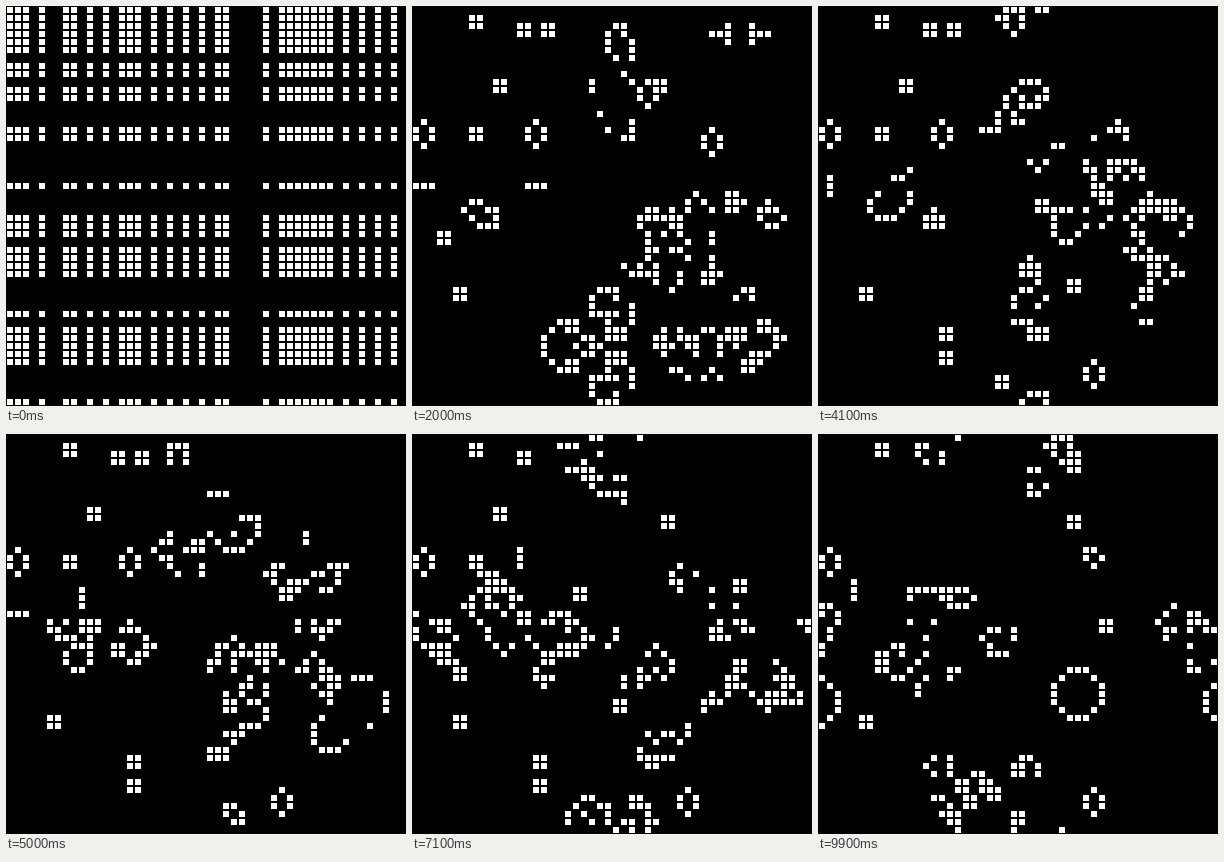
A matplotlib script that plays this animation: 400 px wide and 400 px high, repeating every 10000 ms.

```python
import numpy as np
import matplotlib.pyplot as plt
from matplotlib.animation import FuncAnimation

CELLS, CELL, STEPS = 50, 8, 100

# Seed: every crossing of a live row and a live column
COLS = [0, 1, 2, 4, 7, 8, 10, 12, 14, 15, 16, 18, 20, 22, 24, 26, 27, 32,
        *range(34, 41), 42, 44, 46, 48]
ROWS = [*range(6), 7, 8, 10, 11, 15, 16, 22, 26, 27, 28,
        *range(30, 34), 38, *range(40, 45), 49]


def step(grid):
    """One Game of Life generation on a torus."""
    total = sum(np.roll(grid, (dy, dx), (0, 1))
                for dy in (-1, 0, 1) for dx in (-1, 0, 1))
    return ((total == 3) | ((total == 4) & (grid == 1))).astype(int)


def history():
    grid = np.zeros((CELLS, CELLS), int)
    grid[np.ix_(ROWS, COLS)] = 1
    states = [grid]
    while len(states) < STEPS:
        states.append(step(states[-1]))
    return states


tile = np.zeros((CELL, CELL), int)
tile[1:7, 1:7] = 1
states = history()

size = CELLS * CELL
fig = plt.figure(figsize=(size / 100, size / 100), dpi=100, facecolor="black")
ax = fig.add_axes([0, 0, 1, 1])
ax.axis("off")
image = ax.imshow(np.kron(states[0], tile), cmap="gray", vmin=0, vmax=1,
                  interpolation="nearest", aspect="auto")


def draw(i):
    image.set_data(np.kron(states[i], tile))
    return [image]


anim = FuncAnimation(fig, draw, frames=STEPS, interval=100,
                     repeat=True, repeat_delay=0)
plt.show()
```
